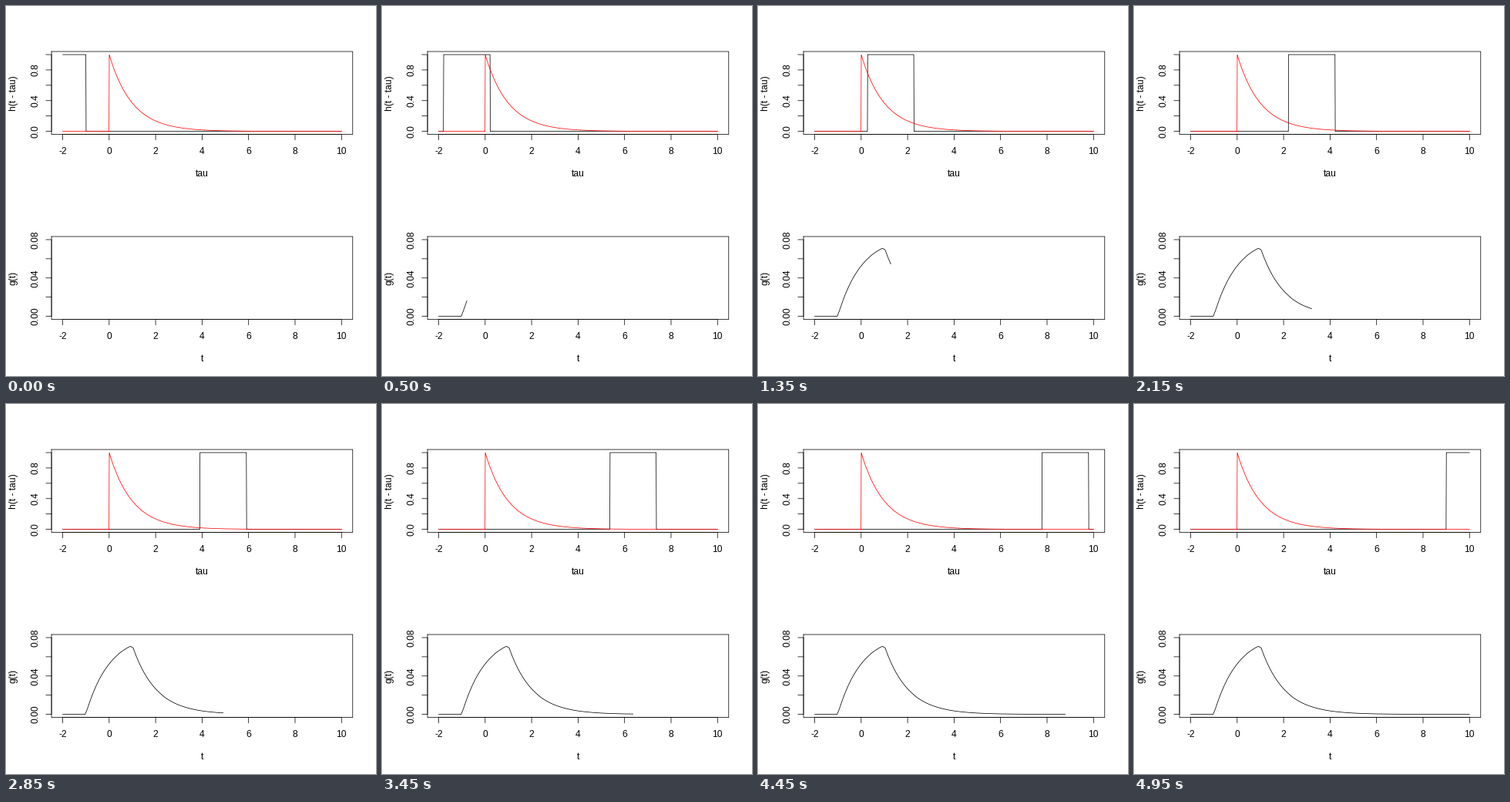
Recreate the animation shown at these times as a matplotlib script. Size 480 by 480 pixels, loop 5000 ms.

```python
import numpy as np
import matplotlib.pyplot as plt
from matplotlib.animation import FuncAnimation

plt.rcParams["font.family"] = "Liberation Sans"
plt.rcParams["path.simplify"] = False

SIZE, DPI = 480, 72
FRAMES, INTERVAL = 100, 50
LINE = 14.4                       # height of one margin line in pixels
LEFT, RIGHT = 59.04, 449.76
TOPS, PANEL_H = (59.04, 299.04), 107.52
PAD = 0.04 / 1.08                 # free share on each side of the data range

fig = plt.figure(figsize=(SIZE / DPI, SIZE / DPI), dpi=DPI, facecolor="white")
ax = fig.add_axes([0, 0, 1, 1])
ax.set_xlim(0, SIZE)
ax.set_ylim(SIZE, 0)
ax.axis("off")


def x_px(x):
    w = RIGHT - LEFT
    return LEFT + w * PAD + (np.asarray(x) + 2) / 12 * w / 1.08


def y_px(y, top, y_max):
    bottom = top + PANEL_H * (1 - PAD)
    return bottom - np.asarray(y) / y_max * PANEL_H / 1.08


def stroke(x, y, color="black"):
    line, = ax.plot(x, y, color=color, lw=0.75, snap=False,
                    solid_capstyle="round", solid_joinstyle="round")
    return line


def label(x, y, text, rotation=0):
    ax.text(x, y, text, size=12, ha="center", va="baseline",
            rotation=rotation, rotation_mode="anchor")


def draw_panel(top, y_max, y_ticks, y_format, x_name, y_name):
    bottom = top + PANEL_H
    stroke([LEFT, RIGHT, RIGHT, LEFT, LEFT], [top, top, bottom, bottom, top])

    stroke(x_px([-2, 10]), [bottom, bottom])
    for v in range(-2, 11, 2):
        stroke([x_px(v)] * 2, [bottom, bottom + LINE / 2])
        label(x_px(v), bottom + 1.8 * LINE, str(v))

    stroke([LEFT, LEFT], y_px([0, y_ticks[-1]], top, y_max))
    for k, v in enumerate(y_ticks):
        y = y_px(v, top, y_max)
        stroke([LEFT - LINE / 2, LEFT], [y, y])
        if k % 2 == 0:
            label(LEFT - 1.2 * LINE, y, format(v, y_format), 90)

    label((LEFT + RIGHT) / 2, bottom + 3.8 * LINE, x_name)
    label(LEFT - 3.2 * LINE, top + PANEL_H / 2, y_name, 90)


def box(x):
    return (np.abs(x) <= 1 + 1e-9).astype(float)


tau = np.linspace(-2, 10, 1000)
times = np.linspace(-2, 10, FRAMES)
decay = np.where(tau >= 0, np.exp(-tau), 0)
conv = np.array([np.mean(box(t - tau) * decay) for t in times])

draw_panel(TOPS[0], 1, np.arange(6) * 0.2, ".1f", "tau", "h(t - tau)")
draw_panel(TOPS[1], 0.08, np.arange(5) * 0.02, ".2f", "t", "g(t)")

window = stroke([], [])
stroke(x_px(tau), y_px(decay, TOPS[0], 1), "red")
result = stroke([], [])


def update(i):
    window.set_data(x_px(tau), y_px(box(times[i] - tau), TOPS[0], 1))
    n = i + 1 if i else 0         # a single point leaves no line
    result.set_data(x_px(times[:n]), y_px(conv[:n], TOPS[1], 0.08))
    return window, result


anim = FuncAnimation(fig, update, frames=FRAMES, interval=INTERVAL,
                     init_func=lambda: update(0), repeat=True)
plt.show()
```
